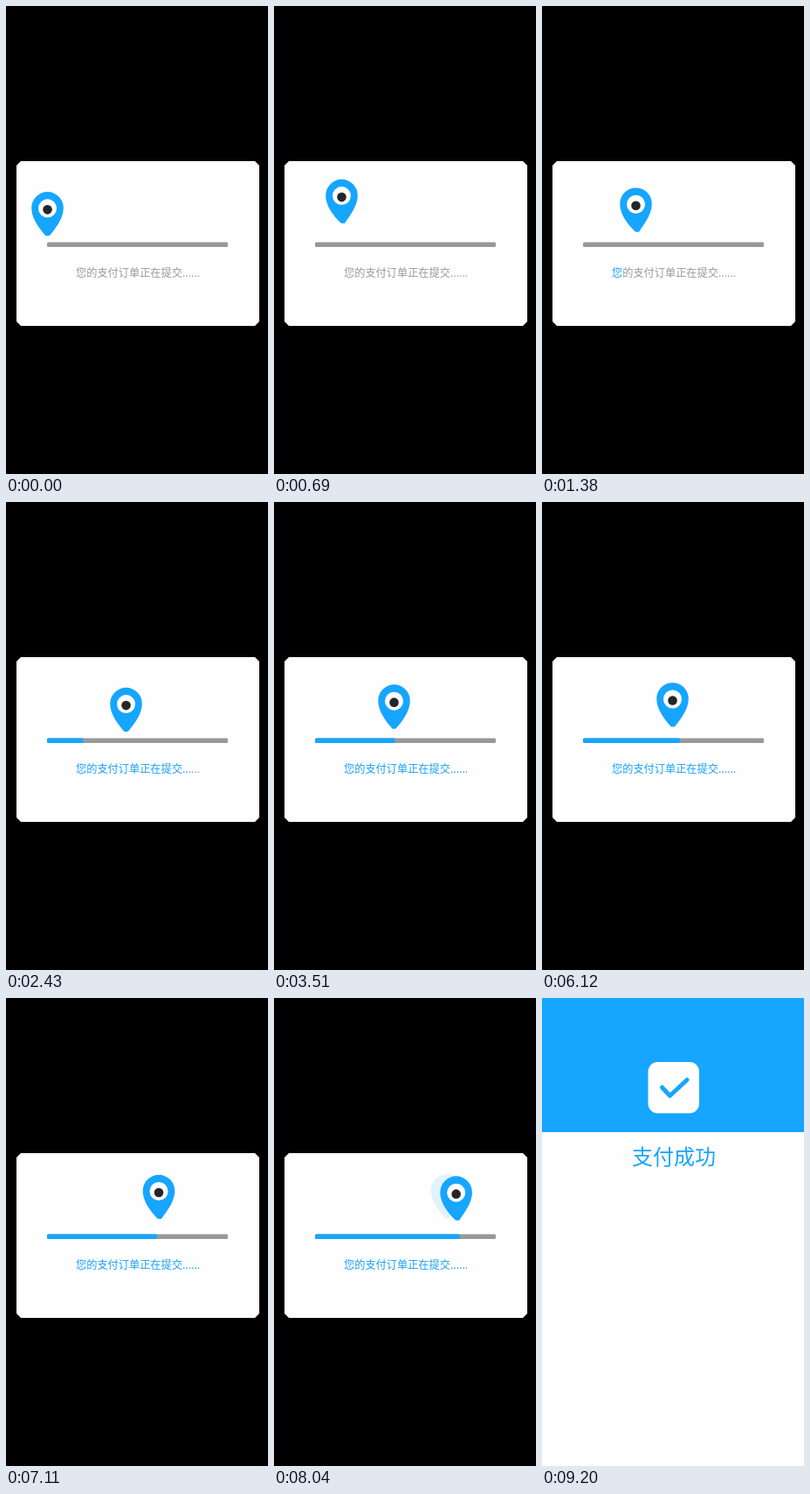
An HTML page that plays this animation: 300 px wide and 534 px high, repeating every 10 s.

```html
<!DOCTYPE html>
<html lang="zh-CN">
<head>
<meta charset="utf-8">
<title>支付</title>
<style>
html, body { margin: 0; width: 100%; height: 100%; overflow: hidden; background: #000; }
svg { display: block; width: 100vw; height: 100vh; }
text { font-family: "Noto Sans CJK SC", "Noto Sans CJK", "Noto Sans", sans-serif; }
.blue { fill: #16a5ff; }
#label { font-size: 12.2px; font-weight: 500; }
#result { font-size: 24px; font-weight: 300; }
</style>
</head>
<body>
<svg viewBox="0 0 300 534">
  <g id="wait">
    <rect width="300" height="534"/>
    <path d="M17 177H285L290 182V360L285 365H17L12 360V182Z" fill="#fefefe"/>
    <rect x="47" y="269.5" width="207" height="5.5" rx="1.5" fill="#989a98"/>
    <rect id="fill" class="blue" x="47" y="269.5" height="5.5" rx="1.5"/>
    <text id="label" x="80" y="308.6"></text>
    <path id="ghost" class="blue" opacity=".12"/>
    <g id="pin">
      <path id="body" class="blue"/>
      <circle cy=".5" r="10.5" fill="#fff"/>
      <circle cy="2" r="5.3" fill="#252525"/>
    </g>
  </g>
  <g id="done">
    <rect width="300" height="534" fill="#fefefe"/>
    <rect class="blue" width="300" height="153"/>
    <rect x="121.5" y="73" width="58.5" height="58.5" rx="11" fill="#fefefe"/>
    <path d="M137.5 102L146.5 111.5L166 93.5" fill="none" stroke="#16a5ff" stroke-width="5" stroke-linecap="round" stroke-linejoin="round"/>
    <text id="result" class="blue" x="103" y="190">支付成功</text>
  </g>
</svg>
<script>
const LOOP = 10000, STEP = 30, LAST = 9000, DONE = 9200;
const TRAIL_FROM = 7500, TRAIL_TO = 8250;
const $ = id => document.getElementById(id);

// key points [time, value], linear in between
const pinX = [[0, 47.5], [2070, 137.5], [4890, 137.5], [6120, 149.5], [7500, 185], [9000, 250.5]];
const hops = [[0, 0], [4920, 10.04], [6120, 12.21], [9000, 18.3]];
const barEnd = [[1540, 47], [3540, 140], [6890, 163.4], [9000, 254]];

function at(keys, t) {
  const i = keys.findIndex(k => t <= k[0]);
  if (i < 0) return keys[keys.length - 1][1];
  if (i === 0) return keys[0][1];
  const [t0, v0] = keys[i - 1], [t1, v1] = keys[i];
  return v0 + (v1 - v0) * (t - t0) / (t1 - t0);
}

const chars = [..."您的支付订单正在提交......"].map(c => {
  const span = document.createElementNS("http://www.w3.org/2000/svg", "tspan");
  span.textContent = c;
  $("label").append(span);
  return span;
});

const drop = lean =>
  `M${lean - 2} 32C-7 26 -18.3 13.5 -18.3 0A18.3 18.3 0 0 1 18.3 0C18.3 13.5 7 26 ${lean + 2} 32Z`;
const move = (id, x, y) => $(id).setAttribute("transform", `translate(${x} ${y})`);
const show = (id, on) => { $(id).style.display = on ? "" : "none"; };

function draw(time) {
  show("wait", time < DONE);
  show("done", time >= DONE);

  const t = Math.min(LAST, Math.floor(time / STEP) * STEP);
  const x = at(pinX, t);
  const y = 222.6 + 7.75 * Math.cos(2 * Math.PI * at(hops, t));
  const lean = (x - at(pinX, t - 150)) / 4;  // tip follows the speed
  move("pin", x, y);
  $("body").setAttribute("d", drop(lean));

  const late = t - TRAIL_FROM;
  show("ghost", late > 0 && t < TRAIL_TO);
  move("ghost", x - late * 0.02, y - late * 0.004);
  $("ghost").setAttribute("d", drop(lean));

  $("fill").setAttribute("width", at(barEnd, t) - 47);
  const lit = Math.floor((t - 1290) / 83);
  chars.forEach((c, i) => c.setAttribute("fill", i < lit ? "#16a0f8" : "#999"));
}

const start = performance.now();
function tick() {
  draw((performance.now() - start) % LOOP);
  requestAnimationFrame(tick);
}
tick();
</script>
</body>
</html>
```
